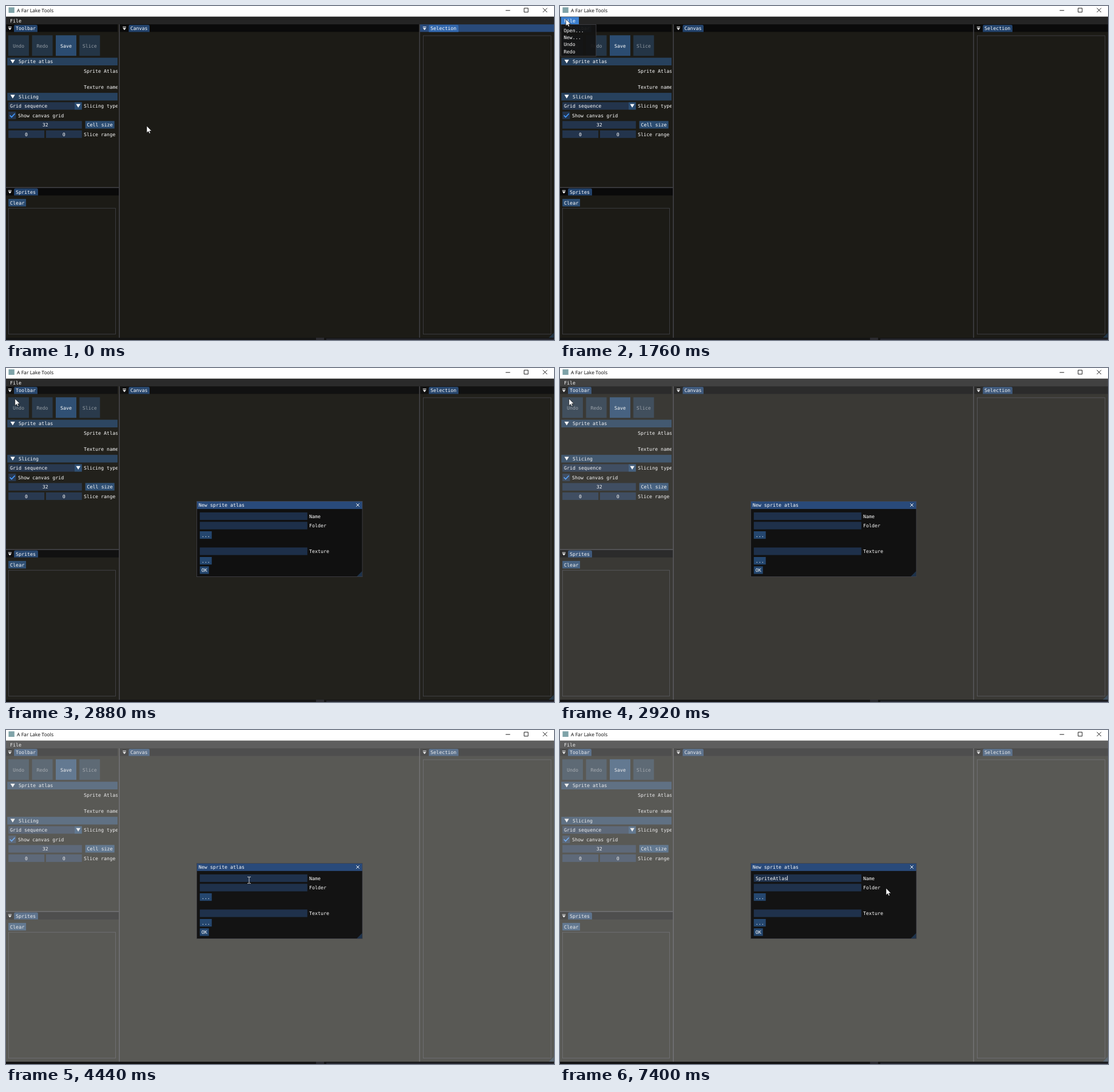
Recreate the animation shown at these times as an HTML page. Size 958 by 585 pixels, loop 8000 ms.

```html
<!DOCTYPE html>
<html lang="en">
<head>
<meta charset="utf-8">
<title>Sprite atlas tool</title>
<style>
html, body { margin: 0; width: 100%; height: 100%; overflow: hidden; background: #1c1b16; }
svg { display: block; width: 958px; height: 585px; }
text { font: 8.33px "DejaVu Sans Mono", "Noto Sans Mono", monospace; fill: #fff; white-space: pre; text-rendering: geometricPrecision; }
.caption { font: 8.6px "Open Sans", "Noto Sans", sans-serif; fill: #000; }
</style>
</head>
<body>
<svg id="stage" viewBox="0 0 958 585" xmlns="http://www.w3.org/2000/svg">
  <defs><clipPath id="side"><rect x="0" y="32" width="195" height="286"/></clipPath></defs>
</svg>
<script>
const LOOP = 8000, STEP = 40, PITCH = 5.015;
const BUTTON = 'rgba(66,150,250,.4)', DISABLED = 'rgba(66,150,250,.21)';
const HEADER = 'rgba(66,150,250,.31)', HOVER = 'rgba(66,150,250,.8)';
const FRAME = 'rgba(41,74,122,.54)', LINE = '#45454b';
const TITLE = '#0a0a0a', TITLE_ON = '#294a7a', TAB = '#23436c', TAB_ON = '#3368ad';
const stage = document.getElementById('stage');

function add(parent, tag, attrs) {
  const el = document.createElementNS('http://www.w3.org/2000/svg', tag);
  for (const key in attrs) el.setAttribute(key, attrs[key]);
  parent.appendChild(el);
  return el;
}
const group = (parent = stage, attrs = {}) => add(parent, 'g', attrs);

// Boxes take edges: left, top, right, bottom.
const box = (p, x, y, r, b, fill, more = {}) =>
  add(p, 'rect', { x, y, width: r - x, height: b - y, fill, ...more });
const outline = (p, x, y, r, b) => box(p, x, y, r, b, 'none', { stroke: LINE, 'stroke-width': .8 });
const path = (p, d, fill, more = {}) => add(p, 'path', { d, fill, ...more });
const stroke = (p, d, color, width) => path(p, d, 'none', { stroke: color, 'stroke-width': width });

// Text is placed by its left edge and the middle of its line.
function label(p, x, mid, str, more = {}) {
  const el = add(p, 'text', { x, y: mid + 3, ...more });
  el.textContent = str;
  return el;
}
const centred = (p, x, mid, str, more = {}) => label(p, x, mid, str, { 'text-anchor': 'middle', ...more });
const arrowDown = (p, x, y, s = 4) =>
  path(p, `M${x - s} ${y - s * .75}h${2 * s}l${-s} ${s * 1.6}z`, '#fff');

function button(p, x, mid, r, str) {
  box(p, x, mid - 6.6, r, mid + 6.6, BUTTON);
  label(p, x + 2.9, mid, str);
}

function titleBar(p, x, r, y, tabEnd, str) {
  const bar = box(p, x, y, r, y + 13.2, TITLE);
  const tx = x + (x ? 15.5 : 14);
  const tab = path(p, `M${tx} ${y + 13.2}v-10q0-2.4 2.4-2.4H${tabEnd - 2.4}q2.4 0 2.4 2.4v10z`, TAB);
  const ix = x + (x ? 8 : 6.8);
  box(p, ix - 3, y + 4, ix + 3, y + 5, '#fff');
  path(p, `M${ix - 3} ${y + 6.2}h6l-3 3.8z`, '#fff');
  label(p, tx + 2.9, y + 6.9, str);
  return { bar, tab };
}

function header(p, mid, str) {
  box(p, 2.3, mid - 6.7, 195, mid + 6.7, HEADER);
  arrowDown(p, 11.7, mid - .3);
  label(p, 22, mid, str);
}

// Main window
const main = group();
box(main, 0, 0, 958, 585, '#1c1b16');
box(main, 0, 18.6, 958, 32.2, '#242424');
const fileItem = box(main, 1.6, 19.2, 33, 32, 'none');
label(main, 7, 25.9, 'File');

const side = group(main, { 'clip-path': 'url(#side)' });
titleBar(side, 0, 197.5, 32.2, 55, 'Toolbar');
[['Undo', 4], ['Redo', 45.5], ['Save', 87], ['Slice', 128.3]].forEach(([str, x]) => {
  const on = str === 'Save';
  box(side, x, 51.3, x + 36, 87.3, on ? BUTTON : DISABLED);
  centred(side, x + 18, 69.5, str, on ? {} : { 'fill-opacity': .5 });
});
header(side, 97.3, 'Sprite atlas');
label(side, 136, 113.8, 'Sprite Atlas');
label(side, 136, 142.4, 'Texture name');
header(side, 158.8, 'Slicing');
box(side, 4.2, 168.5, 120, 181.6, FRAME);
box(side, 120, 168.5, 132.7, 181.6, BUTTON);
arrowDown(side, 126.3, 174.7, 3.8);
label(side, 7, 175, 'Grid sequence');
label(side, 136, 175, 'Slicing type');
box(side, 4.2, 185, 17.4, 198.2, FRAME);
stroke(side, 'M6.8 191.5l3 3.2l5.8-6.2', '#4296fa', 1.8);
label(side, 21, 191.5, 'Show canvas grid');
box(side, 4.2, 201.5, 132.7, 214.7, FRAME);
centred(side, 68.7, 208, '32');
button(side, 138.6, 208, 189.6, 'Cell size');
box(side, 4.2, 217.9, 67, 231.1, FRAME);
box(side, 70, 217.9, 132.7, 231.1, FRAME);
centred(side, 35.5, 224.5, '0');
centred(side, 101.2, 224.5, '0');
label(side, 136, 224.5, 'Slice range');

titleBar(main, 0, 197.5, 318.6, 56, 'Sprites');
button(main, 4.2, 344.5, 35, 'Clear');
outline(main, 4.5, 354.2, 191.4, 574.8);

titleBar(main, 199, 722.3, 32.2, 251, 'Canvas');
const selection = titleBar(main, 723.7, 958, 32.2, 791, 'Selection');
outline(main, 729.5, 52, 952.8, 574.8);
path(main, 'M957.5 572.5v8.5h-8.5z', 'rgba(66,150,250,.22)');
box(main, 197.4, 32.2, 198.9, 581, LINE);
box(main, 722.3, 32.2, 723.7, 581, LINE);
box(main, 0, 317.2, 197.4, 318.6, LINE);

// Grey veil behind the dialog
const veil = box(stage, 0, 18.6, 958, 581, '#ccc', { 'fill-opacity': 0 });

// Window frame
const chrome = group();
box(chrome, 0, 0, 958, 18.6, '#fff');
box(chrome, 4.5, 2.3, 14.7, 12, '#7fa3a8');
label(chrome, 19, 7.7, 'A Far Lake Tools', { class: 'caption' });
stroke(chrome, 'M873.5 7.8h7.8M905.8 3.8h7v7h-7zM938.6 3.6l7.4 7.4M946 3.6l-7.4 7.4', '#000', .9);
box(chrome, 0, 581, 958, 585, '#141414');
box(chrome, 542, 581, 556, 585, '#2b2b30');
box(chrome, 560, 582.5, 958, 585, '#26272f');

// File menu
const menu = group();
box(menu, 1.6, 32.4, 63, 88, 'rgba(20,20,20,.94)');
outline(menu, 1.6, 32.4, 63, 88);
const pick = box(menu, 4, 0, 60.8, 12.2, HOVER);
['Open...', 'New...', 'Undo', 'Redo'].forEach((str, i) => label(menu, 6.6, 43 + 12.2 * i, str));

// Dialog
const dialog = group();
box(dialog, 333.4, 233.5, 623, 365.6, 'rgba(15,15,15,.94)');
box(dialog, 333.4, 233.5, 623, 246.9, TITLE_ON);
label(dialog, 336.8, 240.2, 'New sprite atlas');
stroke(dialog, 'M612.3 237.3l5.4 5.4M617.7 237.3l-5.4 5.4', '#fff', 1);
[['Name', 259.5], ['Folder', 276], ['Texture', 321]].forEach(([str, mid]) => {
  box(dialog, 338.8, mid - 6.6, 526.8, mid + 6.6, FRAME);
  label(dialog, 530, mid, str);
});
button(dialog, 338.8, 292.6, 359.7, '...');
button(dialog, 338.8, 337.6, 359.7, '...');
button(dialog, 338.8, 354, 354.7, 'OK');
path(dialog, 'M622.6 355.8v9.5h-9.5z', 'rgba(66,150,250,.25)');
outline(dialog, 333.4, 233.5, 623, 365.6);
const typed = label(dialog, 342, 259.5, '');
const caret = box(dialog, 0, 255.2, .9, 263.4, '#fff');

// Pointer
const pointer = group();
const arrow = path(pointer, 'M0 0V12.2L2.8 9.6L4.6 13.4L6.5 12.6L4.8 8.9H8.6Z', '#fff',
  { stroke: '#000', 'stroke-width': .6 });
const beam = stroke(pointer, 'M-3 -5.6H-.8L0 -5L.8 -5.6H3M0 -5V5M-3 5.6H-.8L0 5L.8 5.6H3', '#e4e4e4', .9);
const click = add(pointer, 'circle', { r: 8.5, fill: '#ff0', 'fill-opacity': .47 });

const moves = [
  [400, 246, 210], [480, 238, 203], [640, 150, 131], [800, 50, 54], [920, 18, 28.5],
  [1080, 10.5, 21.5], [1160, 9.5, 20.5], [1720, 9.5, 20.5], [1880, 12, 30], [2040, 15, 45],
  [2240, 15.7, 53.7], [3720, 15.7, 53.7], [3880, 70, 95], [4080, 220, 195], [4240, 342, 259],
  [4320, 395, 274], [4440, 425, 263], [4480, 425, 263], [4560, 421, 258.5], [4680, 421, 258.5],
  [4800, 450, 262], [4960, 530, 272], [5160, 570, 277]
];
const clicks = [[1200, 1320], [2640, 2840], [4600, 4680]];
const fade = [[0, 0], [2880, .1], [2920, .49], [2960, .8], [3040, 1]];
const typing = [[0, 0], [6000, 1], [6240, 2], [6360, 3], [6440, 5], [6560, 6],
  [6960, 7], [7080, 8], [7240, 9], [7320, 10], [7400, 11]];

const held = (table, t) => table.filter(row => row[0] <= t).pop()[1];
const within = (t, a, b) => t >= a && t < b;
const show = (el, on) => el.setAttribute('visibility', on ? 'visible' : 'hidden');

function place(t) {
  const i = moves.findIndex(m => m[0] > t);
  if (i === 0) return moves[0].slice(1);
  if (i < 0) return moves[moves.length - 1].slice(1);
  const [t0, x0, y0] = moves[i - 1], [t1, x1, y1] = moves[i];
  const k = (t - t0) / (t1 - t0);
  return [x0 + (x1 - x0) * k, y0 + (y1 - y0) * k];
}

function draw(time) {
  const t = Math.floor(time / STEP) * STEP;
  const [x, y] = place(t);
  const open = within(t, 1240, 2840), modal = t >= 2880;

  pointer.setAttribute('transform', `translate(${x.toFixed(2)} ${y.toFixed(2)})`);
  const editing = modal && x > 339 && x < 527 && y > 253 && y < 283;
  show(beam, editing);
  show(arrow, !editing);
  show(click, clicks.some(([a, b]) => within(t, a, b)));

  const onFile = t < 2840 && x < 33 && y > 19 && y < 32;
  fileItem.setAttribute('fill', onFile ? HOVER : open ? HEADER : 'none');
  show(menu, open);
  const row = Math.floor((y - 36.8) / 12.2);
  show(pick, open && row >= 0);
  pick.setAttribute('y', 36.7 + 12.2 * Math.max(row, 0));

  const focused = t < 1240;
  selection.bar.setAttribute('fill', focused ? TITLE_ON : TITLE);
  selection.tab.setAttribute('fill', focused ? TAB_ON : TAB);

  veil.setAttribute('fill-opacity', .35 * held(fade, t));
  show(dialog, modal);
  const count = held(typing, t);
  typed.textContent = 'SpriteAtlas'.slice(0, count);
  caret.setAttribute('x', 342 + PITCH * count);
  show(caret, within(t, 4600, 5720) || t >= 6000);
}

const start = performance.now();
function tick() {
  draw((performance.now() - start) % LOOP);
  requestAnimationFrame(tick);
}
tick();
</script>
</body>
</html>
```
